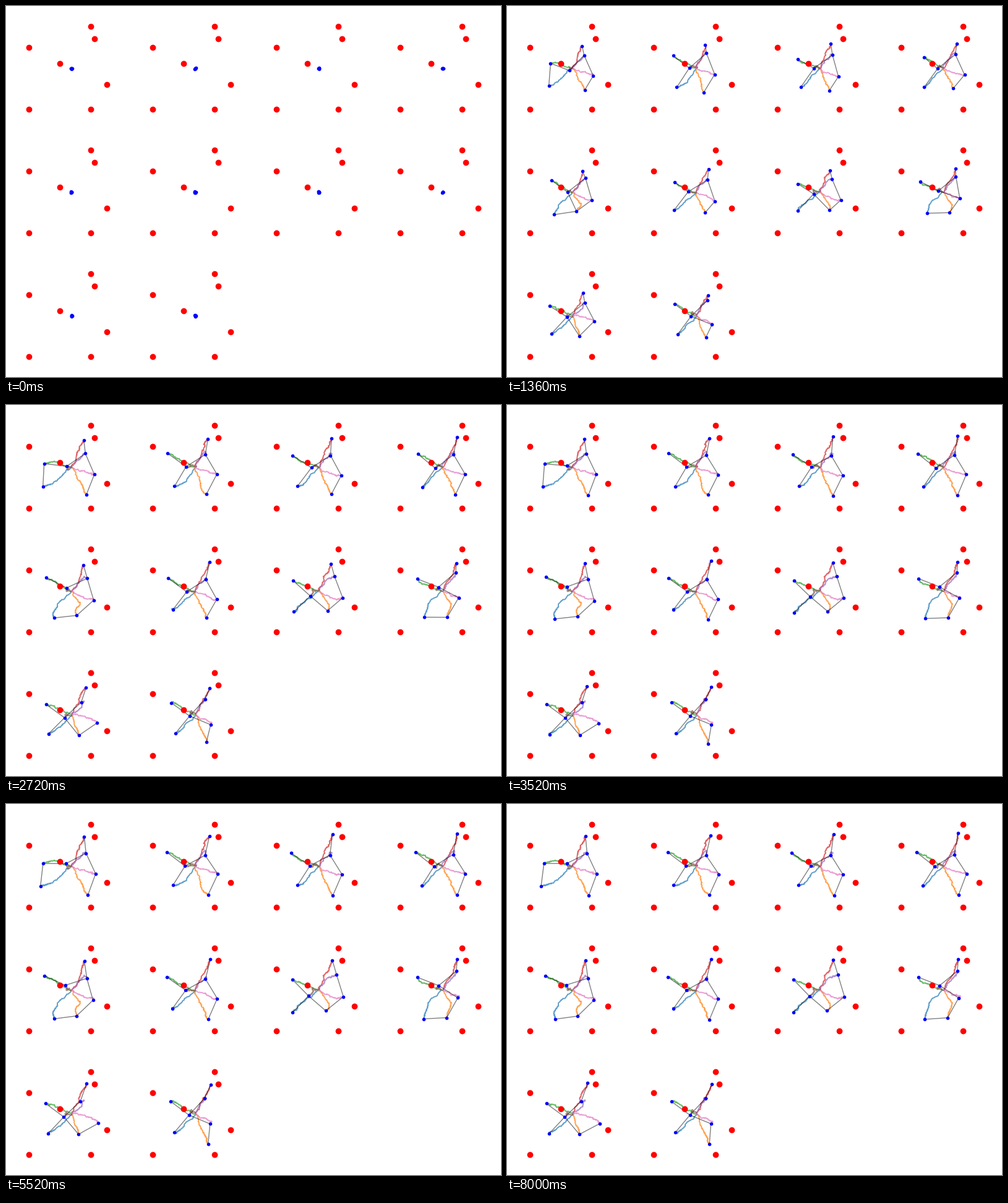
Recreate the animation shown at these times as a matplotlib script. Size 800 by 600 pixels, loop 8080 ms.

```python
import numpy as np
import matplotlib.pyplot as plt
from matplotlib.animation import FuncAnimation
from matplotlib.collections import LineCollection

W, H, DPI = 800, 600, 100
FRAMES, INTERVAL = 101, 80
CELL, COLS = 200, 4
SUB = 4                  # simulation steps per frame
REACH = 36.8             # longest allowed link, in pixels
PULL, DECAY = 1.3, 20    # total attraction and its fading time in frames
NOISE = 0.6              # random step length at the start
COLORS = ["tab:blue", "tab:orange", "tab:green", "tab:red",
          "tab:purple", "tab:brown", "tab:pink"]

TARGETS = np.array([(37, 167), (137, 167), (37, 67), (137, 33),
                    (143, 53), (87, 93), (163, 127)], float)
N = len(TARGETS)

# Links that must hold: three common to every panel, three that may vary.
CORE, USUAL = "25 34 16 ", "05 45 46"
NETS = ["02 45 46", USUAL, USUAL, USUAL, "01 45 46",
        USUAL, "05 15 46", "01 45 56", "05 45 15", "05 45 56"]
TREES = np.array([[sorted(map(int, pair)) for pair in (CORE + net).split()]
                  for net in NETS])
PANELS = len(NETS)
ROWS = np.arange(PANELS)

OFFSETS = np.array([(CELL * (k % COLS), CELL * (k // COLS))
                    for k in ROWS], float)[:, None, :]


def hold_links(pos, rounds=8):
    """Pull both ends of every overlong link back to the allowed length."""
    for _ in range(rounds):
        for i, j in TREES.transpose(1, 2, 0):
            gap = pos[ROWS, j] - pos[ROWS, i]
            dist = np.hypot(gap[:, 0], gap[:, 1])
            excess = np.maximum(dist - REACH, 0) / np.maximum(dist, 1e-9)
            shift = gap * excess[:, None] / 2
            pos[ROWS, i] += shift
            pos[ROWS, j] -= shift


def simulate():
    """Agents start together and seek their targets with fading steps."""
    rng = np.random.default_rng(4)
    pos = TARGETS.mean(axis=0) + rng.normal(0, 0.5, (PANELS, N, 2))
    path = [pos.copy()]
    for step in range((FRAMES - 1) * SUB):
        fade = np.exp(-step / (SUB * DECAY))
        pos += PULL / (SUB * DECAY) * fade * (TARGETS - pos)
        pos += rng.normal(0, NOISE * fade, pos.shape)
        hold_links(pos)
        path.append(pos.copy())
    return np.array(path) + OFFSETS


def links(pts, tree):
    """Segments of the required links and of all other pairs in reach."""
    dist = np.hypot(*(pts[:, None] - pts[None]).transpose(2, 0, 1))
    near = np.triu(dist < REACH, 1)
    near[tree[:, 0], tree[:, 1]] = True
    return list(pts[np.argwhere(near)])


paths = simulate()

fig = plt.figure(figsize=(W / DPI, H / DPI), dpi=DPI, facecolor="white")
ax = fig.add_axes([0, 0, 1, 1])
ax.set_xlim(0, W)
ax.set_ylim(H, 0)
ax.axis("off")

trails = LineCollection([], colors=COLORS * PANELS, linewidths=1.4,
                        alpha=0.7, zorder=1)
edges = LineCollection([], colors="black", linewidths=1, alpha=0.5, zorder=2)
ax.add_collection(trails)
ax.add_collection(edges)
spots = (TARGETS + OFFSETS).reshape(-1, 2)
ax.plot(spots[:, 0], spots[:, 1], "ro", markersize=6, zorder=3)
agents, = ax.plot([], [], "bo", markersize=3, zorder=4)


def draw(frame):
    now = frame * SUB
    pose = paths[now]
    agents.set_data(pose[..., 0].ravel(), pose[..., 1].ravel())
    trails.set_segments([paths[:now + 1, p, a]
                         for p in range(PANELS) for a in range(N)])
    edges.set_segments([seg for pts, tree in zip(pose, TREES)
                        for seg in links(pts, tree)])
    return trails, edges, agents


anim = FuncAnimation(fig, draw, frames=FRAMES, interval=INTERVAL,
                     init_func=lambda: draw(0), repeat=True, repeat_delay=0,
                     blit=False)
plt.show()
```
